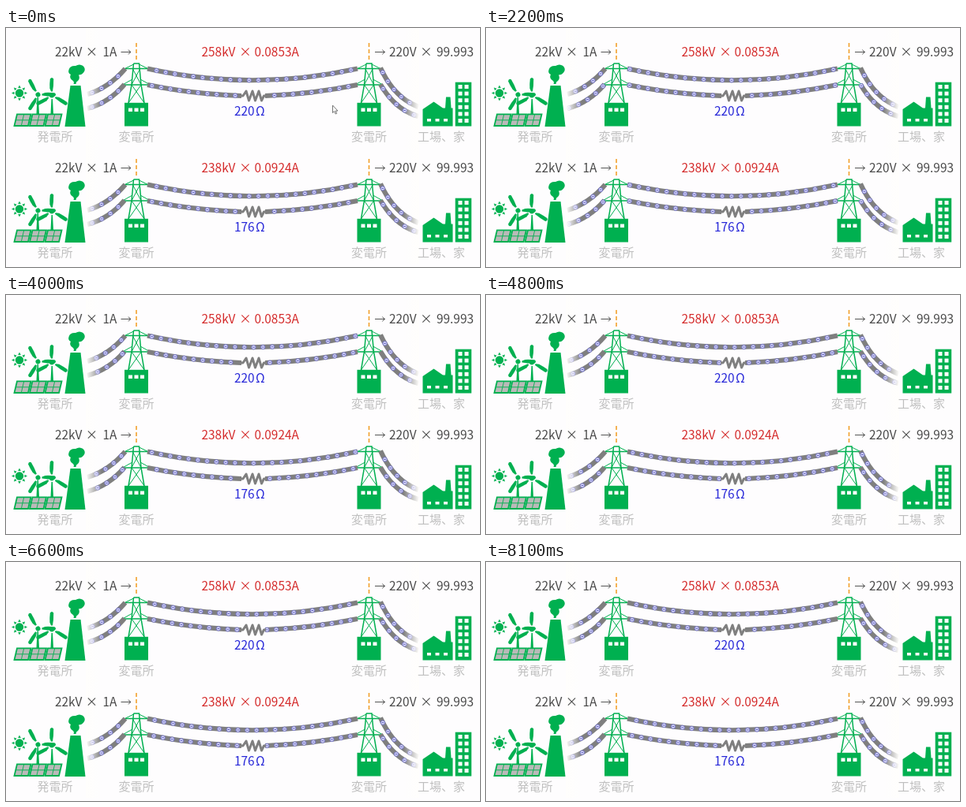
Animation, 600 px wide and 303 px high, one loop 8200 ms. Source, as an HTML page:

```html
<!DOCTYPE html>
<html lang="ja">
<head>
<meta charset="utf-8">
<title>送電と電圧</title>
<style>
html, body { margin: 0; width: 100%; height: 100%; overflow: hidden; background: #fefdfe; }
svg { display: block; width: 600px; height: 303px; }
text { font: 300 15.4px "Noto Sans CJK JP", "Noto Sans CJK", "Noto Sans", sans-serif; fill: #484848; }
.mid { text-anchor: middle; }
.red { fill: #d42a2a; }
.blue { fill: #2626d8; }
.label { fill: #bfbfbf; font-size: 15px; }
.arrow { fill: none; stroke: #555; stroke-width: 1; }
.g { fill: #00b050; }
.line { fill: none; stroke: #00b050; }
.wire { fill: none; stroke: #7f7f7f; stroke-width: 6.2; }
.coil { fill: none; stroke: #7f7f7f; stroke-width: 3; stroke-linejoin: round; }
.hole { fill: #fefdfe; }
.dash { stroke: #f2a12c; stroke-width: 1.6; stroke-dasharray: 5 3; }
</style>
</head>
<body>
<svg id="stage" viewBox="0 0 600 303">
  <defs>
    <linearGradient id="fadeL">
      <stop offset="0" stop-color="#fffefc"/><stop offset="1" stop-color="#fffefc" stop-opacity="0"/>
    </linearGradient>
    <linearGradient id="fadeR">
      <stop offset="0" stop-color="#fffefc" stop-opacity="0"/><stop offset="1" stop-color="#fffefc"/>
    </linearGradient>
    <g id="dot">
      <circle r="2.7" fill="#dedef6" stroke="#6a6ac6" stroke-width=".9"/>
      <path d="M-1.4 0H1.4" stroke="#4747bd" stroke-width=".9"/>
    </g>
    <path id="arrow" class="arrow" d="M-6.5 0H6M2.8 -2.8L6 0L2.8 2.8"/>
    <path id="blade" d="M-1-5L-2.6-9Q-2.9-15-2.2-21Q0-24 2.2-21Q2.4-13 1-5Z"/>
    <g id="rotor">
      <use href="#blade"/><use href="#blade" transform="rotate(120)"/><use href="#blade" transform="rotate(240)"/>
      <circle r="3"/>
    </g>
    <g id="panel">
      <path d="M4.5 109.3H22L18.5 124H1Z" fill="#b9bab8" stroke="#00b050" stroke-width="1.8"/>
      <path class="line" d="M2.8 116.8H20.2M13.2 109.5L9.8 124" stroke-width=".9"/>
    </g>
    <g id="tower">
      <path class="dash" d="M0 19V43"/>
      <path class="line" stroke-width="1.5" d="M-3.5 45H3.5L6 72L10 95M-3.5 45L-6 72L-10 95M-14.5 51.5H14.5M-17.5 72H17.5"/>
      <path class="line" stroke-width="1" d="M-14.5 51.5L-3.5 46M14.5 51.5L3.5 46M-17.5 72L-5 65M17.5 72L5 65M-4.5 52L6 72M4.5 52L-6 72M-6 72L10 95M6 72L-10 95"/>
      <rect class="g" x="-15" y="94.8" width="30" height="29.7"/>
      <path class="hole" d="M-10 101.5h5v4.5h-5zM-2.5 101.5h5v4.5h-5zM5 101.5h5v4.5h-5z"/>
    </g>
    <g id="plant" class="g">
      <g id="sun"><circle cx="17" cy="82.5" r="5.2"/></g>
      <path d="M39.5 88H41L42 109H38.5ZM57.5 90H59L60 109H56.5Z"/>
      <use href="#rotor" transform="translate(40.5 84.5) rotate(-30)"/>
      <use href="#rotor" transform="translate(58 85.5)"/>
      <use href="#panel" x="9.5"/><use href="#panel" x="29"/><use href="#panel" x="48.5"/>
      <path d="M81.5 73H94.5L100.5 125H74.5Z"/>
      <path d="M85.5 71Q87 68 83.5 66A5 5 0 0 1 82 59Q78 57 79.5 53Q81 47.5 88 48Q93 45 97.5 48Q101.5 52 98.5 56Q96 59.5 92 59.5Q94 64 91 67Q88.500 68 88.500 71Z"/>
    </g>
    <g id="town">
      <path class="g" d="M527.5 103L541.500 93.500L553 101.500H556L557 87.500H562.500L563.500 101.500H565.500V124.500H527.500Z"/>
      <path class="hole" d="M533 115h5v3.500h-5zM543.500 115h5v3.500h-5zM554 115h5v3.500h-5z"/>
      <rect class="g" x="568.7" y="68.700" width="20.500" height="55.800"/>
      <g id="panes" class="hole"></g>
    </g>
  </defs>
  <path id="cursor" d="M413.5 98V107.5L415.7 105.5L417.2 109L418.7 108.3L417.2 105H420Z" fill="#fff" stroke="#666" stroke-width=".9"/>
</svg>
<script>
const NS = 'http://www.w3.org/2000/svg';
const LOOP = 8200, STEP = 100;
const $ = id => document.getElementById(id);

function add(parent, tag, attrs, text) {
  const el = document.createElementNS(NS, tag);
  for (const k in attrs) el.setAttribute(k, attrs[k]);
  if (text) el.textContent = text;
  return parent.appendChild(el);
}

for (let i = 0; i < 8; i++)
  add($('sun'), 'path', { d: 'M15.2 76L17 72.5L18.8 76Z', transform: `rotate(${i * 45} 17 82.5)` });
for (let r = 0; r < 6; r++)
  for (let c = 0; c < 2; c++)
    add($('panes'), 'rect', { x: 572.5 + c * 8, y: 72 + r * 8.6, width: 5, height: 5 });

// path, dot spacing, spacings travelled per loop, starting phase
const wires = [
  ['M103 84Q130 76 151 51.5', 13, 5, 0.5],
  ['M103 102Q130 95 150 71.5', 13, -5, 0.5],
  ['M179 51.5Q312 81 445 51.5', 11.8, 1, 0],
  ['M179 72Q238 84 298 86', 11.8, -1, 0.5],
  ['M328 86Q387 84 445 72', 11.8, -1, 0],
  ['M474 50.5Q491 88 522 100', 13, 5, 0.5],
  ['M474 71.5Q493 104 522 112', 13, -5, 0.5]
];
const flows = [];

function row(y, kv, amp, ohm) {
  const g = add($('stage'), 'g', { transform: `translate(0 ${y})` });
  const use = (id, x = 0, y = 0) => add(g, 'use', { href: '#' + id, x, y });
  const say = (x, by, s, cls = '') => add(g, 'text', { x, y: by, class: cls }, s);

  use('tower', 165);
  use('tower', 459.5);
  for (const [d, gap, turns, phase] of wires) {
    const path = add(g, 'path', { d, class: 'wire' });
    const len = path.getTotalLength();
    const dots = Array.from({ length: Math.ceil(len / gap) + 1 }, () => use('dot'));
    flows.push({ path, len, gap, turns, phase, dots });
  }
  add(g, 'path', { class: 'coil', d: 'M297 86H300L304 80L307.500 92L312 80L315.500 92L320 80L323.500 92L326.500 86H329' });
  add(g, 'rect', { x: 101, width: 20, height: 152, fill: 'url(#fadeL)' });
  add(g, 'rect', { x: 503, width: 20, height: 152, fill: 'url(#fadeR)' });
  use('plant');
  use('town');

  say(62, 35.5, '22kV');
  say(108.5, 35.5, '×', 'mid');
  say(122.5, 35.5, '1A');
  use('arrow', 152, 30.5);
  say(247.5, 35.5, kv, 'red');
  say(303, 35.5, '×', 'red mid');
  say(314.5, 35.5, amp, 'red');
  use('arrow', 473.5, 30.5);
  say(485, 35.5, '220V');
  say(532, 35.5, '×', 'mid');
  say(545, 35.5, '99.993');
  say(289, 111, ohm, 'blue');
  say(316, 111, 'Ω', 'blue');
  say(62, 143.3, '発電所', 'label mid');
  say(165, 143.3, '変電所', 'label mid');
  say(459.5, 143.3, '変電所', 'label mid');
  say(521, 143.3, '工場、家', 'label');
}

row(0, '258kV', '0.0853A', '220');
row(147, '238kV', '0.0924A', '176');
$('stage').append($('cursor'));

function draw(now) {
  const t = Math.floor((now % LOOP) / STEP) * STEP;
  for (const { path, len, gap, turns, phase, dots } of flows) {
    const turn = turns * t / LOOP + phase;
    const shift = turn - Math.floor(turn);
    dots.forEach((dot, i) => {
      const s = (i + shift) * gap;
      const on = s > 2 && s < len - 2;
      dot.style.display = on ? '' : 'none';
      if (!on) return;
      const p = path.getPointAtLength(s);
      dot.setAttribute('x', p.x);
      dot.setAttribute('y', p.y);
    });
  }
  $('cursor').style.display = t < 200 ? '' : 'none';
}

const start = performance.now();
function tick() {
  draw(performance.now() - start);
  requestAnimationFrame(tick);
}
tick();
</script>
</body>
</html>
```
